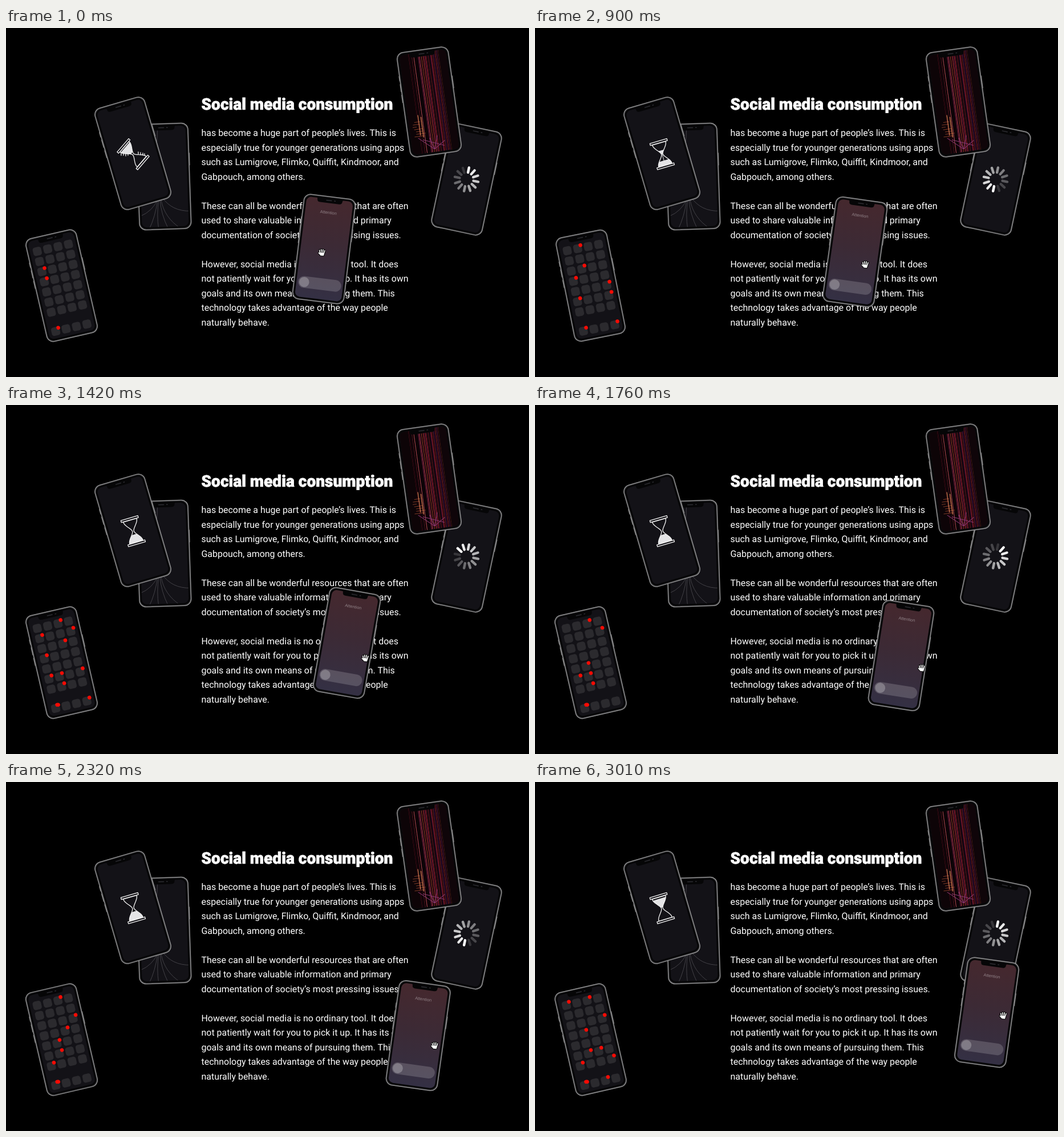
These frames come from a looping animation (917 by 611 pixels, 3.04 s). An HTML page:

```html
<!DOCTYPE html>
<html lang="en">
<head>
<meta charset="utf-8">
<title>Social media consumption</title>
<style>
  html, body { margin: 0; width: 100%; height: 100%; overflow: hidden; background: #000; }
  svg { display: block; width: 100vw; height: 100vh; }
  #copy { font: 15.94px Roboto, sans-serif; fill: #fff; text-rendering: geometricPrecision; }
  #copy .title { font-weight: 900; font-size: 28.1px; stroke: #fff; stroke-width: .7; }
  .flash { background: #c0c; }
  .flash #copy { fill: #000; }
  .flash #copy .title { stroke: #000; }
  .line { fill: none; stroke: #f2f2f2; stroke-width: 1.3; stroke-linecap: round; stroke-linejoin: round; }
</style>
</head>
<body>
<svg id="stage" viewBox="0 0 917 611"></svg>
<script>
const LOOP = 3040;
const stage = document.getElementById('stage');
const $ = id => document.getElementById(id);
const range = n => [...Array(n).keys()];
const clamp = v => Math.max(0, Math.min(1, v));

// Seeded random numbers
let seed = 11;
const rnd = () => (seed = seed * 16807 % 2147483647) / 2147483647;

const lines = [
  'has become a huge part of people’s lives. This is',
  'especially true for younger generations using apps',
  'such as Lumigrove, Flimko, Quiffit, Kindmoor, and',
  'Gabpouch, among others.', '',
  'These can all be wonderful resources that are often',
  'used to share valuable information and primary',
  'documentation of society’s most pressing issues.', '',
  'However, social media is no ordinary tool. It does',
  'not patiently wait for you to pick it up. It has its own',
  'goals and its own means of pursuing them. This',
  'technology takes advantage of the way people',
  'naturally behave.'
];

// Phones are drawn around their own centre
const place = (x, y, a) => `translate(${x} ${y}) rotate(${a})`;

const phone = (id, x, y, a, content, fill = '#131217') => `
  <g id="${id}" transform="${place(x, y, a)}">
    <path d="M-46.2 -52v9M-46.2 -38v14M-46.2 -19v14M46.2 -40v22" stroke="#777" stroke-width="1.4"/>
    <rect x="-45.4" y="-92.4" width="90.8" height="184.8" rx="11.8" fill="#2b2b2d" stroke="#8f8f90" stroke-width="1.5"/>
    <rect x="-43.6" y="-90.6" width="87.2" height="181.2" rx="10.6" fill="#060607"/>
    <rect x="-41" y="-88" width="82" height="176" rx="8.5" fill="${fill}"/>
    <g clip-path="url(#screen)">${content}</g>
    <path d="M-25 -89h50q-3 0 -3 3q0 5 -5 5h-34q-5 0 -5 -5q0 -3 -3 -3z" fill="#060607"/>
    <path d="M-6 -85.5h9M8 -85.5h1.5" stroke="#2e2e33" stroke-width="1.5" stroke-linecap="round"/>
  </g>`;

// App grid with badges: seven rows and a dock
const cellX = i => -28.1 + 18.7 * (i % 4);
const cellY = i => i < 28 ? -68 + 18.2 * Math.floor(i / 4) : 75.6;
const badges = [ // cell, on, off
  [0, 2800, LOOP], [1, 600, 1100], [2, 1100, LOOP], [4, 1360, 1750], [7, 1100, 1800],
  [8, 0, 300], [9, 700, 1150], [10, 1200, 1700], [11, 2300, LOOP], [12, 0, 1650],
  [13, 2850, LOOP], [14, 1850, 2350], [17, 1700, 2750], [19, 500, 1000], [20, 400, 1800],
  [21, 1360, LOOP], [22, 2400, LOOP], [23, 800, 1600], [24, 1900, LOOP], [25, 1150, 2300],
  [27, 2500, LOOP], [28, 0, LOOP], [30, 2900, LOOP], [31, 550, 1700]
];
const apps = range(32).map(i =>
  `<rect x="${cellX(i) - 7.5}" y="${cellY(i) - 7.5}" width="15" height="15" rx="4.2" fill="#2b2a2e"/>`).join('') +
  badges.map(([i]) => `<circle class="badge" cx="${cellX(i) + 5.8}" cy="${cellY(i) - 5}" r="3.3" fill="#f80b04"/>`).join('') +
  `<circle id="twin" cx="${cellX(28) + 3.8}" cy="${cellY(28) - 5.4}" r="3.3" fill="#f80b04"/>`;

// Broken display
const hues = ['#8a1a2c', '#b03040', '#000', '#c4553a', '#000', '#6a1f4a', '#2a0a14', '#4a1a58'];
const stripes = '<rect x="-41" y="-88" width="82" height="176" fill="#0d0407"/>' +
  range(56).map(() => `<rect x="${-25 + 52 * rnd()}" y="-88" width="${0.4 + rnd() * 0.9}" height="176"
    fill="${hues[Math.floor(rnd() * 8)]}" opacity="${0.5 + rnd() * 0.5}"/>`).join('') +
  '<rect x="28" y="-88" width="13" height="176" fill="#10060a" opacity=".8"/>' +
  range(7).map(i => `<path d="M${-36 + rnd() * 6} ${32 + i * 4.2}h${6 + rnd() * 12}" stroke="#b8583a" stroke-width=".9" opacity=".7"/>`).join('') +
  '<path d="M-23 20v36M-18 24v36" stroke="#e08a58" stroke-width="1.1"/>' +
  '<path d="M-28 60L-2 83L18 70M-20 64L16 79M-2 83L-8 62M-2 83L6 60" fill="none" stroke="#8c3872" stroke-width="1"/>';

const cracks = `<path fill="none" stroke="#55545a" stroke-width=".7" d="M-8 -82Q-9 -60 -14 -40
  M-12 40Q-22 60 -43 68M-12 40Q-17 70 -29 92M-10 40Q-15 66 -12 92M-8 40Q-7 66 5 92
  M-6 40Q-2 72 27 92M-4 36Q12 62 46 62"/>`;

const spokes = range(12).map(i =>
  `<path class="spoke" d="M0 -12.3V-21" transform="rotate(${i * 30})" stroke="#fff" stroke-width="4.4" stroke-linecap="round"/>`).join('');

// Slice of the hourglass glass between two heights
function glass(y0, y1) {
  const halfWidth = y => 1.2 + 11 * Math.sin(Math.PI / 2 * Math.abs(y) / 20) ** 1.6;
  const side = s => range(17).map(i => {
    const y = y0 + (y1 - y0) * i / 16;
    return `${(s * halfWidth(y)).toFixed(2)} ${y.toFixed(2)}`;
  });
  return 'M' + [...side(-1), ...side(1).reverse()].join('L') + 'z';
}

const hourglass = `<g transform="translate(0 1.5)">
  <g id="glass">
    <path id="sandTop" fill="#e4e4e6"/><path id="sandBottom" fill="#e4e4e6"/>
    <path id="stream" d="M0 -2V19" stroke="#e4e4e6" stroke-width="1"/>
    <path class="line" d="${glass(-20, 20)}M-15.5 -23.8h31v3.4h-31zM-15.5 20.4h31v3.4h-31z"/>
  </g>
  <g transform="rotate(16)">
    <path id="arcs" class="line" d="M4 -20Q15 -17 17 -8M4 -15Q11 -13 13 -6M8 -20Q18 -18 21 -11"/>
    <path id="ticks" class="line" d="M-21 -3v5M-17 -2v4M-13 -1v4M-9 -1v3M9 -4v4M13 -3v4M17 -2v4M20 -1v3"/>
  </g></g>`;

const attention = `
  <text y="-62" text-anchor="middle" font-family="'Liberation Sans', Arial, sans-serif" font-size="7.4" fill="#928388">Attention</text>
  <rect x="-38" y="51.3" width="76" height="20.4" rx="10.2" fill="#fff" opacity=".17"/>
  <circle cx="-27.4" cy="61.5" r="8.8" fill="#fff" opacity=".24"/>`;

const fingers = 'M-3.8 0L-4.6 -3.4M-1.2 -1L-1.8 -5M1.4 -1L1.4 -5.2M3.8 0L4.5 -3.8M-5.6 1.2L-3 3.6M-3.4 .8H3.6L2.8 4.8H-1.8z';

stage.innerHTML = `
  <defs>
    <clipPath id="screen"><rect x="-41" y="-88" width="82" height="176" rx="8.5"/></clipPath>
    <linearGradient id="dusk" x2="0" y2="1">
      <stop stop-color="#45282e"/><stop offset=".45" stop-color="#3c2a35"/><stop offset="1" stop-color="#343044"/>
    </linearGradient>
  </defs>
  <g id="copy">
    <text class="title" x="342.5" y="143">Social media consumption</text>
    ${lines.map((s, i) => `<text x="342.5" y="${189 + i * 25.54}">${s}</text>`).join('')}
  </g>
  ${phone('cracked', 276.5, 260, -2, cracks)}
  ${phone('waiting', 222.5, 219.5, -16.3, hourglass)}
  ${phone('loading', 807.5, 265, 12, spokes)}
  ${phone('broken', 742, 129.5, -8, stripes)}
  ${phone('apps', 97.5, 451, -13, apps)}
  ${phone('dragged', 0, 0, 0, attention, 'url(#dusk)')}
  <g id="hand" stroke-linecap="round" stroke-linejoin="round">
    <path d="${fingers}" fill="#000" stroke="#000" stroke-width="3.6"/>
    <path d="${fingers}" fill="#fff" stroke="#fff" stroke-width="1.6"/>
  </g>`;

// Smooth monotone path through rows of [time, ...values]
function track(t, keys) {
  const i = keys.findIndex(k => k[0] > t) - 1;
  const [a, b, c, d] = [-1, 0, 1, 2].map(o => keys[Math.max(0, Math.min(keys.length - 1, i + o))]);
  const slope = (p, q, r, j) => (q[j] - p[j]) * (r[j] - q[j]) <= 0 ? 0 : (r[j] - p[j]) / (r[0] - p[0]);
  const h = c[0] - b[0], u = (t - b[0]) / h, v = 1 - u;
  return b.slice(1).map((_, k) => {
    const j = k + 1;
    return b[j] * v * v * (1 + 2 * u) + c[j] * u * u * (1 + 2 * v) +
      h * u * v * (slope(a, b, c, j) * v - slope(b, c, d, j) * u);
  });
}

const handKeys = [[0, 554, 393], [500, 554, 393], [900, 579, 414], [1300, 611, 435], [1420, 630, 443],
  [2070, 720, 469], [2610, 785, 443], [3010, 821, 409], [LOOP, 824, 406]];
const dragKeys = [[0, 557.5, 387, 7], [700, 557.5, 387, 7], [900, 561, 392, 8], [1300, 588.5, 411.5, 10],
  [1420, 597.5, 416.5, 10], [2070, 684.5, 450.5, 8], [2610, 763.5, 429, 8], [3010, 792, 403.5, 8], [LOOP, 794, 401, 8]];
const spinKeys = [[0, 0], [900, 6], [1300, 9], [1420, 10], [2070, 16], [2610, 21], [3010, 24], [LOOP, 24.3]];

const show = (el, on) => { el.style.display = on ? '' : 'none'; };
const badgeEls = [...document.querySelectorAll('.badge')];
const spokeEls = [...document.querySelectorAll('.spoke')];

function drawHourglass(t) {
  const p = t < 300 ? (t + 400) / 700 : clamp((t - 2350) / 700);
  const turning = p > 0;
  const fallen = clamp((t - 300) / 1000);
  $('glass').setAttribute('transform', `rotate(${180 * (1 - (1 - p) ** 2)})`);
  $('sandTop').setAttribute('d', turning ? '' : glass(-17 * (1 - fallen), 0));
  $('sandBottom').setAttribute('d', turning ? glass(6 - 5 * p, 20 - 3 * p) : glass(20 - 14 * fallen, 20));
  show($('stream'), !turning && fallen < 1);
  show($('arcs'), p > 0.15 && p < 0.5);
  show($('ticks'), p >= 0.5 && p < 0.7);
}

function draw() {
  const t = performance.now() % LOOP;
  document.body.className = t >= 1240 && t < 1380 ? 'flash' : '';

  const [x, y, a] = track(t, dragKeys);
  $('dragged').setAttribute('transform', place(x, y, a));
  $('hand').setAttribute('transform', place(...track(t, handKeys), 6));

  // Buzzing in short bursts
  const s = (t - 900 + 585 + 1170) % 1170 - 585;
  const buzz = t < 315 ? 0 : 3 * Math.cos(2 * Math.PI * (s + 26) / 170) * Math.exp(-((s / 150) ** 2));
  $('apps').setAttribute('transform', place(97.5, 451, -13 + buzz));
  badges.forEach(([, on, off], i) => show(badgeEls[i], t >= on && t < off));
  show($('twin'), t > 1200);

  const head = Math.round(track(t, spinKeys)[0]);
  spokeEls.forEach((el, i) => el.setAttribute('opacity', 1 - (i - head + 36) % 12 / 12 * 0.93));

  drawHourglass(t);
  requestAnimationFrame(draw);
}
draw();
</script>
</body>
</html>
```
